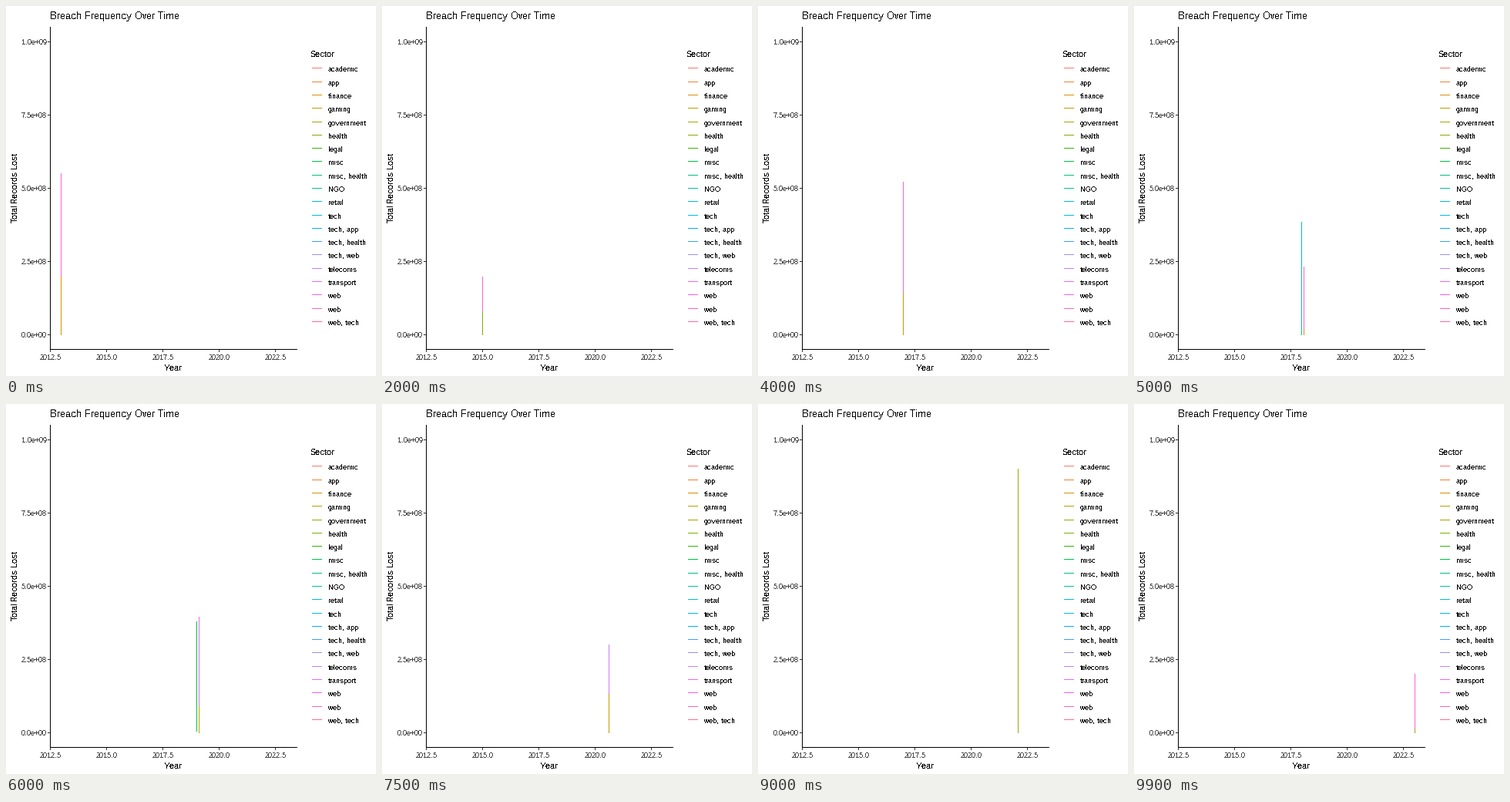
A matplotlib script that plays this animation: 480x480 px, repeating every 10 s.

```python
import numpy as np
import matplotlib.pyplot as plt
from matplotlib.animation import FuncAnimation
from matplotlib.patches import Rectangle

plt.rcParams.update({
    "font.family": "Liberation Sans",
    "text.hinting": "native",
    "text.hinting_factor": 1,
    "text.antialiased": False,
})

SIZE, FRAMES = 480, 100

SECTORS = [
    ("academic", "#f8766d"), ("app", "#ea8331"), ("finance", "#d89000"),
    ("gaming", "#c09b00"), ("government", "#a3a500"), ("health", "#7cae00"),
    ("legal", "#39b600"), ("misc", "#00bb4e"), ("misc, health", "#00bf7d"),
    ("NGO", "#00c1a3"), ("retail", "#00bfc4"), ("tech", "#00bae0"),
    ("tech, app", "#00b0f6"), ("tech, health", "#35a2ff"),
    ("tech, web", "#9590ff"), ("telecoms", "#c77cff"),
    ("transport", "#e76bf3"), ("web", "#fa62db"), ("web", "#ff62bc"),
    ("web, tech", "#ff6a98"),
]
# The first of two equal names wins.
HUE = dict(reversed(SECTORS))

# Frame on which each year from 2013 to 2023 is reached.
KEYS = [0, 10, 20, 30, 40, 49, 59, 69, 79, 89, 99]
YEARS = np.arange(2013, 2024)

# Moving lines: sector, first year, height per year (millions); back to front.
TRACKS = [
    ("web", 2013, [551, 145, 198, 260, 520, 212, 419, 180, 0]),
    ("finance", 2013, [200, 76]),
    ("health", 2014, [10, 80, 10]),
    ("finance", 2016, [10, 143, 20]),
    ("telecoms", 2020, [0, 500, 500]),
    ("gaming", 2018, [10, 92, 72, 172]),
    ("web", 2022, [500, 200]),
    ("government", 2021, [42, 1000, 12]),
]

# Lines that stand still for one year, then vanish: sector, year, low, high.
HELD = [
    ("finance", 2014, 0, 76),
    ("tech", 2016, 0, 500),
    ("retail", 2018, 0, 383),
    ("misc", 2019, 5, 380),
]

fig = plt.figure(figsize=(4.8, 4.8), dpi=100, facecolor="white")
ax = fig.add_axes([0, 0, 1, 1])
ax.set_xlim(0, SIZE)
ax.set_ylim(SIZE, 0)
ax.axis("off")


def x_px(year):
    return int(71.82 + 29.235 * (year - 2013))


def y_px(millions):
    return int(426.5 - 0.38 * millions)


def box(x, y, w, h, color):
    return ax.add_patch(Rectangle((x, y), w, h, fc=color, lw=0))


def label(x, y, text, px, color="black", **kw):
    ax.text(x, y, text, fontsize=px * 0.72, color=color, **kw)


def draw_axes():
    for k in range(5):
        x, y = 57 + 73 * k, 426 - 95 * k
        box(x, 446, 1, 3, "#333333")
        box(54, y, 3, 1, "#333333")
        label(x + 0.5, 459, f"{2012.5 + 2.5 * k:.1f}", 9, "#4d4d4d", ha="center")
        label(53, y + 4, f"{k * 2.5e8:.1e}", 9, "#4d4d4d", ha="right")
    box(57, 27, 1, 419, "black")
    box(57, 445, 321, 1, "black")
    label(57, 17, "Breach Frequency Over Time", 13)
    label(217, 473, "Year", 11, ha="center")
    label(17.5, 236, "Total Records Lost", 11, rotation=90,
          ha="right", va="center")


def draw_legend():
    label(395, 66, "Sector", 11)
    for i, (name, color) in enumerate(SECTORS):
        y = round(80.48 + 17.28 * i)
        box(397, y, 13, 1, color)
        label(418, y + 5, name, 9)


draw_axes()
draw_legend()
lines = [box(0, 0, 1, 0, HUE[t[0]]) for t in HELD + TRACKS]


def place(line, year, low, high):
    top = y_px(high)
    line.set_bounds(x_px(year), top, 1, y_px(low) + 1 - top)


def update(frame):
    year = np.interp(frame, KEYS, YEARS)
    for line, (_, start, low, high) in zip(lines, HELD):
        line.set_visible(start <= year < start + 1)
        place(line, start, low, high)
    for line, (_, start, highs) in zip(lines[len(HELD):], TRACKS):
        end = start + len(highs) - 1
        line.set_visible(start <= year < end or year == end == YEARS[-1])
        place(line, year, 0, np.interp(year, np.arange(start, end + 1), highs))
    return lines


anim = FuncAnimation(fig, update, frames=FRAMES, interval=100,
                     repeat=True, repeat_delay=0, blit=False)
plt.show()
```
